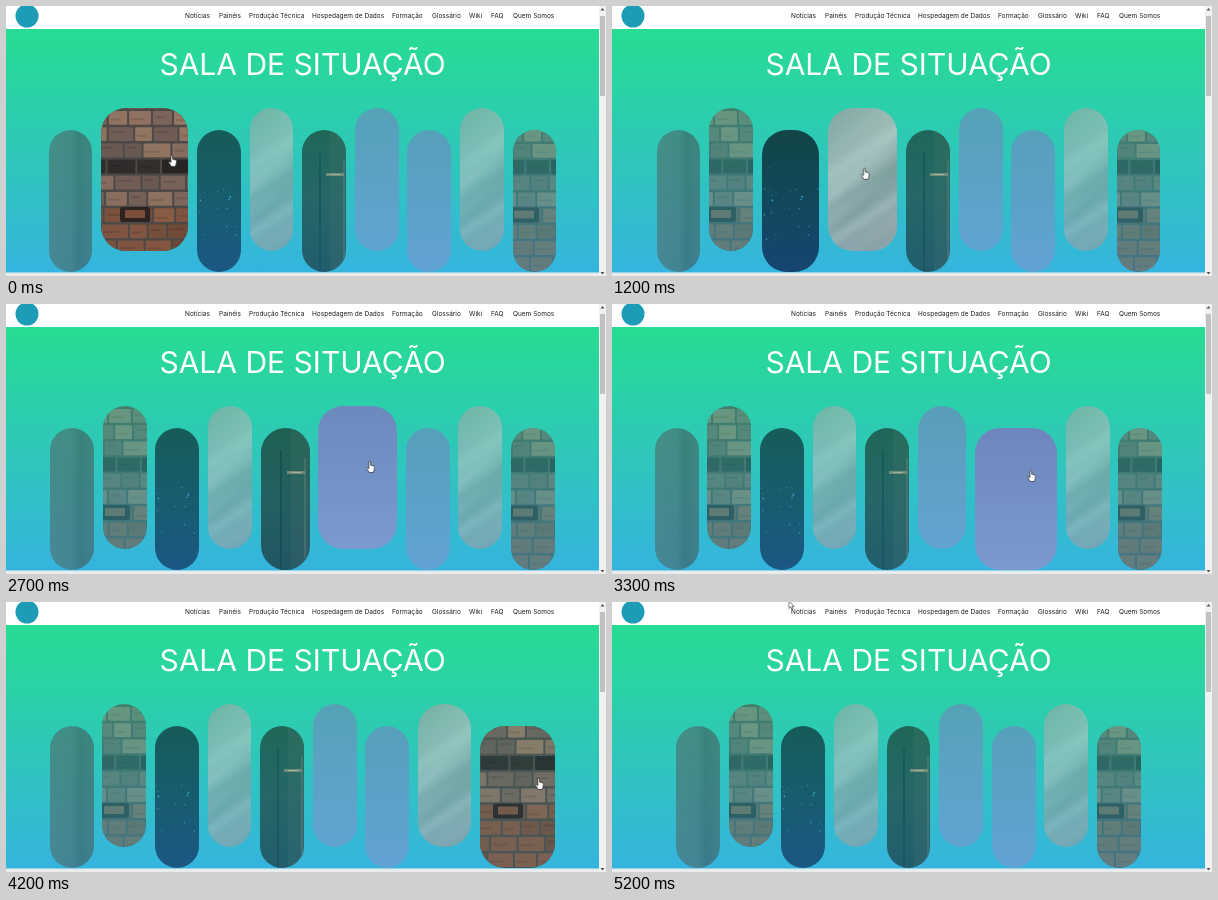
These frames come from a looping animation (600 by 270 pixels, 5300 ms). An HTML page:

```html
<!DOCTYPE html>
<html lang="pt-BR">
<head>
<meta charset="utf-8">
<title>Sala de Situação</title>
<style>
html, body { margin: 0; width: 100%; height: 100%; overflow: hidden; }
#stage { position: relative; width: 600px; height: 270px; overflow: hidden; background: #e9eced; }
#stage > svg { position: absolute; left: 0; top: 0; }
text { font-family: Inter, sans-serif; }
#nav text { font-size: 6.5px; fill: #1c1c1c; }
#title { font-size: 30px; fill: #fff; text-anchor: middle; }
#cards { position: absolute; left: 0; top: 102px; width: 593px; height: 164px; display: flex; justify-content: center; gap: 8.8px; }
.card { position: relative; flex: none; width: 43.8px; height: 142.5px; border-radius: 25px; overflow: hidden; opacity: .6; }
.card:nth-child(odd) { margin-top: 21.5px; }
.card svg { position: absolute; left: 50%; top: 0; margin-left: -44px; }
#cursor { position: absolute; left: 0; top: 0; width: 12px; height: 14px; }
#cursor svg { position: absolute; left: 0; top: 0; overflow: visible; }
#arrow { opacity: 0; }
</style>
</head>
<body>
<div id="stage">
  <svg width="600" height="270">
    <defs>
      <linearGradient id="page" x2="0" y2="1"><stop stop-color="#27dc92"/><stop offset="1" stop-color="#35b4de"/></linearGradient>
      <linearGradient id="mist" x2="1" y2="0"><stop stop-color="#576c6c"/><stop offset=".5" stop-color="#4e6565"/><stop offset=".58" stop-color="#405454"/><stop offset="1" stop-color="#566a6a"/></linearGradient>
      <linearGradient id="night" x2="0" y2="1"><stop stop-color="#07131e"/><stop offset=".5" stop-color="#071b34"/><stop offset="1" stop-color="#0b1b48"/></linearGradient>
      <linearGradient id="silk" x2=".6" y2="1"><stop stop-color="#8c9a9a"/><stop offset=".3" stop-color="#a9b1b1"/><stop offset=".52" stop-color="#b9bdbd"/><stop offset=".72" stop-color="#929b9c"/><stop offset="1" stop-color="#aaa7aa"/></linearGradient>
      <linearGradient id="room" x2="0" y2="1"><stop stop-color="#18261f"/><stop offset=".5" stop-color="#1f2c29"/><stop offset="1" stop-color="#162322"/></linearGradient>
      <linearGradient id="sky" x2="0" y2="1"><stop stop-color="#7184bf"/><stop offset="1" stop-color="#8098d0"/></linearGradient>
      <filter id="soft"><feGaussianBlur stdDeviation="3"/></filter>
    </defs>
    <rect width="593" height="23" fill="#fff"/>
    <rect y="23" width="593" height="243.5" fill="url(#page)"/>
    <rect x="593" width="7" height="270" fill="#f1f1f1"/>
    <rect x="594" y="10" width="5" height="80" fill="#c1c1c1"/>
    <path d="M594.5 4.5l2-2.5 2 2.5zM594.5 266l2 2.5 2-2.5z" fill="#555"/>
    <circle cx="21" cy="10" r="11.5" fill="#1d9cb8"/>
    <g id="nav"></g>
    <text id="title" x="296.5" y="69">SALA DE SITUAÇÃO</text>
  </svg>
  <div id="cards"></div>
  <div id="cursor">
    <svg id="hand" width="12" height="14"><path d="M-1.2-5.2q1-1 1.8 0v3.3l3 .8q1 .3.9 1.4l-.6 3.2-.8 2h-4l-2.6-4.2q.2-1.3 1.4-.5l.9.8z" fill="#fff" stroke="#222" stroke-width=".7"/></svg>
    <svg id="arrow" width="12" height="14"><path d="M-1-4v7.5l1.7-1.6 1.2 2.6 1.2-.6-1.2-2.5h2.3z" fill="#fff" stroke="#222" stroke-width=".6"/></svg>
  </div>
</div>
<script>
const LOOP = 5300, FADE = 500;
const $ = id => document.getElementById(id);

function seeded(seed) {
  return () => (seed = (seed * 16807) % 2147483647) / 2147483647;
}
const rect = (x, y, w, h, fill, extra = '') =>
  `<rect x="${x}" y="${y}" width="${w}" height="${h}" fill="${fill}" ${extra}/>`;
const fill = id => rect(0, 0, 88, 143, `url(#${id})`);

function bricks(shift) {
  const rnd = seeded(4217), rowH = 16.2;
  let out = rect(0, 0, 88, 170, '#4d4947');
  for (let row = -1; row < 10; row++) {
    const y = 2 + row * rowH;
    let x = -rnd() * 22;
    while (x < 88) {
      const w = 18 + rnd() * 13, v = rnd();
      const hue = row > 5 ? 19 : 16 + v * 8;
      const sat = row === 3 ? 5 : row > 5 ? 33 : 10 + v * 12;
      const light = row === 3 ? 15 + v * 6 : row > 5 ? 31 + v * 10 : 34 + v * 17;
      out += rect(x, y + 1, w - 2, rowH - 2.4, `hsl(${hue} ${sat}% ${light}%)`, 'rx="1"');
      out += rect(x + 2, y + 3 + v * 7, w * .5, 2, '#000', 'opacity=".12"');
      x += w;
    }
  }
  out += rect(19, 99, 30, 15, '#2a2321', 'rx="2"') + rect(24, 102, 20, 8, '#7c4f3b', 'rx="1"');
  return `<g transform="translate(0 ${-shift})">${out}</g>`;
}

function stars() {
  const rnd = seeded(91);
  let out = fill('night');
  for (let i = 0; i < 46; i++) {
    const x = rnd() * 88, y = 22 + (rnd() + rnd()) * 48, r = .3 + rnd() * .6;
    out += `<circle cx="${x}" cy="${y}" r="${r}" fill="#4a9fe0" opacity="${.4 + rnd() * .6}"/>`;
  }
  return out;
}

function silk() {
  let out = fill('silk');
  for (let i = 0; i < 4; i++) {
    const y = 50 + i * 34;
    out += `<path d="M-10 ${y + 24}L98 ${y - 46}v9L-10 ${y + 36}z" fill="${i % 2 ? '#7f8b8c' : '#d0d4d4'}" opacity=".4" filter="url(#soft)"/>`;
  }
  return out;
}

const room = () => fill('room') +
  rect(50, 0, 20, 143, '#38392f', 'opacity=".5"') +
  rect(39, 22, 2, 121, '#0b1413') + rect(63, 30, 2, 100, '#51443a') +
  rect(46, 43, 18, 3, '#a0694f') + rect(50, 44, 10, 1, '#e0a888');

const photos = [fill('mist'), bricks(0), stars(), silk(), room(), fill('sky'), fill('sky'), silk(), bricks(21.5)];
$('cards').innerHTML = photos
  .map(p => `<div class="card"><svg width="88" height="143">${p}</svg></div>`).join('');

const links = [
  [179, 'Notícias'], [213, 'Painéis'], [243, 'Produção Técnica'], [306, 'Hospedagem de Dados'],
  [386, 'Formação'], [426, 'Glossário'], [463, 'Wiki'], [485, 'FAQ'], [507, 'Quem Somos']
];
$('nav').innerHTML = links.map(([x, s]) => `<text x="${x}" y="12">${s}</text>`).join('');

// Steps are [ms, style, easing]
function play(el, steps) {
  const frames = steps.map(([t, style, easing = 'linear']) => ({ offset: t / LOOP, easing, ...style }));
  el.animate(frames, { duration: LOOP, iterations: Infinity });
}

const rest = { width: '43.8px', opacity: .6 };
const open = { width: '87px', opacity: 1 };

// Hover spans: [card, enter, leave]
const hovers = [
  [1, -FADE, 300], [2, 318, 1000], [3, 1030, 1712], [4, 1735, 2405],
  [5, 2450, 3000], [6, 3025, 3490], [7, 3505, 3960], [8, 3985, 4720]
];
const cards = $('cards').children;
for (const [i, enter, leave] of hovers) {
  const grow = enter < 0
    ? [[0, open]]
    : [[0, rest], [enter, rest, 'ease'], [Math.min(enter + FADE, leave), open]];
  play(cards[i], [...grow, [leave, open, 'ease'], [leave + FADE, rest], [LOOP, rest]]);
}

const path = [
  [0, 166, 155], [310, 187, 160], [600, 209, 165], [1010, 238, 167], [1720, 293, 170],
  [1800, 319, 170], [2430, 345, 164], [2700, 364, 163], [3010, 398, 169], [3300, 419, 172],
  [3495, 451, 175], [3970, 505, 181], [4200, 533, 182], [4600, 535, 180], [4720, 525, 124],
  [4950, 400, 45], [5200, 178, 3], [LOOP, 178, 3]
];
play($('cursor'), path.map(([t, x, y]) => [t, { transform: `translate(${x}px, ${y}px)` }]));

const swap = (el, a, b) => play(el, [[0, { opacity: a }], [4720, { opacity: a }], [4720, { opacity: b }], [LOOP, { opacity: b }]]);
swap($('hand'), 1, 0);
swap($('arrow'), 0, 1);
</script>
</body>
</html>
```
